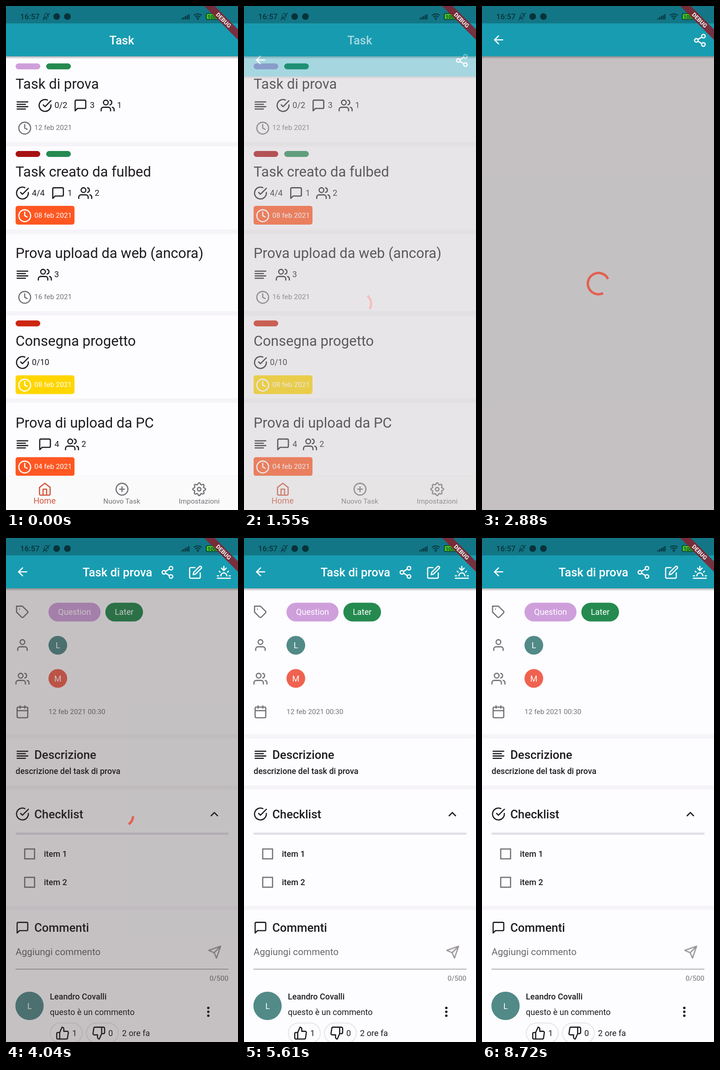
These frames come from a looping animation (508x1102 px, 8820 ms). An HTML page:

```html
<!DOCTYPE html>
<html lang="it">
<head>
<meta charset="utf-8">
<title>Task</title>
<style>
html, body { margin: 0; width: 100%; height: 100%; overflow: hidden; background: #fdfcff; }
svg { display: block; width: 100vw; height: 100vh; font-family: Roboto, "Noto Sans", sans-serif; }
.icon { fill: none; stroke-width: 2; stroke-linecap: round; stroke-linejoin: round; }
#page { animation: rise 8820ms infinite, fade 8820ms infinite linear; }
#wait { animation: leave 8820ms infinite step-end; }
#done { animation: enter 8820ms infinite step-end; }
#busy { animation: clear 8820ms infinite linear; }
@keyframes rise {
  0%, 14.399% { transform: translateY(275.5px); animation-timing-function: cubic-bezier(.4, 0, .2, 1); }
  20.102%, 100% { transform: translateY(0); }
}
@keyframes fade {
  0% { opacity: 0; }
  14.399% { opacity: 0; animation-timing-function: ease-in; }
  17.574% { opacity: .38; }
  20.975% { opacity: .88; }
  23.356%, 100% { opacity: 1; }
}
@keyframes leave { 0% { opacity: 1; } 45.805%, 100% { opacity: 0; } }
@keyframes enter { 0% { opacity: 0; } 45.805%, 100% { opacity: 1; } }
@keyframes clear { 0%, 46.145% { opacity: 1; } 47.732%, 100% { opacity: 0; } }
</style>
</head>
<body>
<svg viewBox="0 0 508 1102" preserveAspectRatio="none">
  <defs>
    <linearGradient id="shade" x2="0" y2="1">
      <stop stop-color="#000" stop-opacity=".3"/>
      <stop offset="1" stop-color="#000" stop-opacity="0"/>
    </linearGradient>
  </defs>
  <g id="list"></g>
  <g id="page">
    <g id="base"></g>
    <g id="wait"></g>
    <g id="done"></g>
    <g id="busy">
      <rect y="110" width="508" height="992" fill="#3c3232" fill-opacity=".29"/>
      <path id="arc" fill="none" stroke="#e2604f" stroke-width="5.2"/>
    </g>
  </g>
  <g id="system"></g>
</svg>
<script>
const LOOP = 8820;
const INK = '#1e1c20', GREY = '#757276', TEAL = '#189cb1', PAPER = '#fdfcff', GAP = '#f6f4f8';
const ORANGE = '#ff5722', YELLOW = '#ffd600', GREEN = '#258a50', LILAC = '#cf9fdc', SEA = '#528a88';
const $ = id => document.getElementById(id);

function gear() {
  let d = '';
  for (let i = 0; i < 96; i++) {
    const a = i * Math.PI / 48, r = 9.5 + 1.4 * Math.cos(8 * a);
    d += (i ? 'L' : 'M') + (12 + r * Math.cos(a)).toFixed(2) + ' ' + (12 + r * Math.sin(a)).toFixed(2);
  }
  return d + 'Z';
}
const ring = (x, y, r) => `M${x - r} ${y}a${r} ${r} 0 1 0 ${2 * r} 0a${r} ${r} 0 1 0 ${-2 * r} 0`;

const ICONS = {
  lines: 'M3 6H21M3 10H17M3 14H21M3 18H17',
  check: 'M22 11.08V12a10 10 0 1 1-5.93-9.14M22 4 12 14.01l-3-3',
  message: 'M21 15a2 2 0 0 1-2 2H7l-4 4V5a2 2 0 0 1 2-2h14a2 2 0 0 1 2 2z',
  users: 'M17 21v-2a4 4 0 0 0-4-4H5a4 4 0 0 0-4 4v2M23 21v-2a4 4 0 0 0-3-3.87M16 3.13a4 4 0 0 1 0 7.75' + ring(9, 7, 4),
  user: 'M20 21v-2a4 4 0 0 0-4-4H8a4 4 0 0 0-4 4v2' + ring(12, 7, 4),
  clock: ring(12, 12, 10) + 'M12 6v6l4 2',
  home: 'M3 9l9-7 9 7v11a2 2 0 0 1-2 2H5a2 2 0 0 1-2-2zM9 22V12h6v10',
  plus: ring(12, 12, 10) + 'M12 8v8M8 12h8',
  gear: gear() + ring(12, 12, 3),
  tag: 'M20.59 13.41l-7.17 7.17a2 2 0 0 1-2.83 0L2 12V2h10l8.59 8.59a2 2 0 0 1 0 2.82zM7 7h.01',
  calendar: 'M5 4h14a2 2 0 0 1 2 2v14a2 2 0 0 1-2 2H5a2 2 0 0 1-2-2V6a2 2 0 0 1 2-2zM16 2v4M8 2v4M3 10h18',
  send: 'M22 2 11 13M22 2l-7 20-4-9-9-4z',
  up: 'M14 9V5a3 3 0 0 0-3-3l-4 9v11h11.28a2 2 0 0 0 2-1.7l1.38-9a2 2 0 0 0-2-2.3zM7 22H4a2 2 0 0 1-2-2v-7a2 2 0 0 1 2-2h3',
  down: 'M10 15v4a3 3 0 0 0 3 3l4-9V2H5.72a2 2 0 0 0-2 1.7l-1.38 9a2 2 0 0 0 2 2.3zm7-13h2.67A2.31 2.31 0 0 1 22 4v7a2.31 2.31 0 0 1-2.33 2H17',
  share: ring(18, 5, 3) + ring(6, 12, 3) + ring(18, 19, 3) + 'M8.59 13.51l6.83 3.98M15.41 6.51l-6.82 3.98',
  edit: 'M11 4H4a2 2 0 0 0-2 2v14a2 2 0 0 0 2 2h14a2 2 0 0 0 2-2v-7M18.5 2.5a2.12 2.12 0 0 1 3 3L12 15l-4 1 1-4z',
  sunset: 'M17 18a5 5 0 0 0-10 0M12 9V2M4.22 10.22l1.42 1.42M1 18h2M21 18h2M18.36 11.64l1.42-1.42M23 22H1M16 5l-4 4-4-4',
  bell: 'M13.73 21a2 2 0 0 1-3.46 0M18.63 13A17.89 17.89 0 0 1 18 8M6.26 6.26A5.86 5.86 0 0 0 6 8c0 7-3 9-3 9h14M18 8a6 6 0 0 0-9.33-5M1 23 23 1'
};

const icon = (name, x, y, color = INK, scale = 1.292) =>
  `<path class="icon" d="${ICONS[name]}" stroke="${color}" transform="translate(${x} ${y}) scale(${scale})"/>`;
const text = (x, y, size, s, fill = INK, weight = 400, anchor = 'start') =>
  `<text x="${x}" y="${y}" font-size="${size}" fill="${fill}" font-weight="${weight}" text-anchor="${anchor}">${s}</text>`;
const rect = (x, y, w, h, fill, r = 0) =>
  `<rect x="${x}" y="${y}" width="${w}" height="${h}" rx="${r}" fill="${fill}"/>`;
const disc = (x, y, r, fill) => `<circle cx="${x}" cy="${y}" r="${r}" fill="${fill}"/>`;
const bar = rect(0, 110, 508, 6, 'url(#shade)') + rect(0, 0, 508, 110, TEAL);

// y is the middle of the card title; parts are [icon, x, label]
function card(y, title, pills, parts, date, fill) {
  let s = pills.map((c, i) => rect(21 + 67 * i, y - 44.5, 54, 13, c, 6.5)).join('');
  s += text(21, y + 11, 31, title);
  for (const [name, x, label] of parts)
    s += icon(name, x, y + 32) + (label ? text(x + 36.3, y + 53, 18.1, label) : '');
  if (fill) s += rect(21, y + 75.5, 129, 41, fill, 5);
  const color = fill ? '#fff' : GREY;
  return s + icon('clock', 25.5, y + 81.5, color) + text(62, y + 101, 15.5, date, color);
}

$('list').innerHTML = rect(0, 0, 508, 1102, PAPER) +
  [297, 489, 667, 858].map(y => rect(0, y, 508, 10, GAP)).join('') +
  card(170, 'Task di prova', [LILAC, GREEN],
    [['lines', 20.5], ['check', 70, '0/2'], ['message', 147.5, '3'], ['users', 207, '1']], '12 feb 2021') +
  card(361.5, 'Task creato da fulbed', ['#a81113', GREEN],
    [['check', 20.5, '4/4'], ['message', 98.5, '1'], ['users', 158, '2']], '08 feb 2021', ORANGE) +
  card(540, 'Prova upload da web (ancora)', [], [['lines', 20.5], ['users', 69.5, '3']], '16 feb 2021') +
  card(732, 'Consegna progetto', ['#cc2510'], [['check', 20.5, '0/10']], '08 feb 2021', YELLOW) +
  card(911, 'Prova di upload da PC', [],
    [['lines', 20.5], ['message', 70, '4'], ['users', 129, '2']], '04 feb 2021', ORANGE) +
  rect(0, 1027, 508, 1, '#f1f0f3') + rect(0, 1028, 508, 74, '#fafafb') +
  icon('home', 69.5, 1041, '#d2573c') + text(84.5, 1088, 18.1, 'Home', '#d2573c', 400, 'middle') +
  icon('plus', 238.5, 1041, GREY) + text(253.5, 1088, 15.5, 'Nuovo Task', GREY, 400, 'middle') +
  icon('gear', 407.5, 1041, GREY) + text(423, 1088, 15.5, 'Impostazioni', GREY, 400, 'middle') +
  bar + text(253.5, 84, 25.8, 'Task', '#fff', 500, 'middle');

$('base').innerHTML = rect(0, 0, 508, 1102, PAPER) + bar +
  '<path d="M20 11H7.83l5.59-5.59L12 4l-8 8 8 8 1.41-1.41L7.83 13H20z" fill="#fff" transform="translate(20.5 58.5) scale(1.292)"/>';
$('wait').innerHTML = icon('share', 461.5, 59.5, '#fff');

const chip = (x, w, fill, s) => rect(x, 141.5, w, 41, fill, 20.5) + text(x + w / 2, 168, 18.1, s, '#fff', 400, 'middle');
const avatar = (x, y, r, fill, s) => disc(x, y, r, fill) + text(x, y + 6.5, 18.1, s, '#fff', 400, 'middle');
const item = (y, s) =>
  `<rect x="41" y="${y - 10.5}" width="21.5" height="21.5" fill="none" stroke="${GREY}" stroke-width="2.6"/>` +
  text(83, y + 6.5, 18, s, INK, 500);
const head = (name, y, s) => icon(name, 20.5, y - 15.5, INK) + text(62, y + 9, 25.8, s, INK, 500);
const vote = (x, name, n) =>
  `<rect x="${x}" y="1060.5" width="70" height="44" rx="22" fill="none" stroke="#e6e3ea" stroke-width="2"/>` +
  icon(name, x + 11.5, 1067) + text(x + 48, 1089, 18.1, n);

$('done').innerHTML =
  text(244, 84, 25.8, 'Task di prova', '#fff', 500, 'middle') +
  icon('share', 338, 59.5, '#fff') + icon('edit', 399.5, 59.5, '#fff') + icon('sunset', 461.5, 59.5, '#fff') +
  [429, 541, 804].map(y => rect(0, y, 508, 9, GAP)).join('') +
  icon('tag', 20.5, 146.5, GREY) + chip(93, 114, LILAC, 'Question') + chip(217.5, 82.5, GREEN, 'Later') +
  icon('user', 20.5, 218.5, GREY) + avatar(113.5, 234.5, 20.5, SEA, 'L') +
  icon('users', 20.5, 292, GREY) + avatar(113.5, 307, 20.5, '#f0624f', 'M') +
  icon('calendar', 20.5, 364.5, GREY) + text(93, 385, 15.5, '12 feb 2021 00:30', GREY) +
  head('lines', 474, 'Descrizione') + text(21, 516, 18, 'descrizione del task di prova', INK, 500) +
  head('check', 603.5, 'Checklist') +
  `<path d="M448.5 608l7.7-7.7 7.7 7.7" fill="none" stroke="${INK}" stroke-width="2.6"/>` +
  rect(21, 644, 466, 5, '#e3e0e7') + item(690.5, 'item 1') + item(752.5, 'item 2') +
  head('message', 852, 'Commenti') + text(21, 911.5, 20.7, 'Aggiungi commento', '#6b686c') +
  icon('send', 441.5, 890, '#98949a') + rect(21, 942, 466, 1.3, '#8c8a8c') +
  text(487, 968, 15.5, '0/500', GREY, 400, 'end') +
  avatar(51.5, 1023, 31, SEA, 'L') + text(96, 1009, 18, 'Leandro Covalli', INK, 500) +
  text(96, 1042.5, 18.1, 'questo è un commento') +
  [1027.5, 1036, 1044.5].map(y => disc(443, y, 2.7, INK)).join('') +
  vote(97, 'up', '1') + vote(176, 'down', '0') + text(254, 1089, 18.1, '2 ore fa');

const DARK = '#08323a';
$('system').innerHTML = rect(0, 0, 508, 38, 'rgba(0,0,0,.24)') +
  text(31, 29, 16.8, '16:57', DARK, 500) + icon('bell', 80, 15, DARK, .68) +
  disc(111, 23, 7.3, DARK) + disc(134.5, 23, 7.3, DARK) +
  [0, 1, 2, 3, 4].map(i => rect(384 + 3.8 * i, 26.5 - 2.2 * i, 2.5, 3 + 2.2 * i, DARK, .6)).join('') +
  `<path d="M411.5 20.5a12.5 12.5 0 0 1 17 0M414.5 24a8 8 0 0 1 11 0M417.3 27.2a4 4 0 0 1 5.4 0" fill="none" stroke="${DARK}" stroke-width="2"/>` +
  disc(420, 29, 1.5, DARK) +
  `<rect x="438.5" y="16.500" width="25" height="13" rx="3" fill="#45c51d" stroke="${DARK}" stroke-width="1.6"/>` +
  rect(465, 20, 2, 6, DARK) + text(451, 27.500, 11.500, '100', DARK, 500, 'middle') +
  `<path d="M472 17l-4 7h3l-1 6 5-8h-3z" fill="${DARK}"/>` +
  '<path d="M434 0h23l51 51v23z" fill="#85222f" fill-opacity=".88"/>' +
  '<g transform="translate(476.500 31) rotate(45)">' +
  text(.6, 5.600, 12.800, 'DEBUG', 'rgba(0,0,0,.45)', 900, 'middle') +
  text(0, 4.600, 12.800, 'DEBUG', '#f3e6e8', 900, 'middle') + '</g>';

// cubic-bezier(.4, 0, .2, 1)
function ease(x) {
  if (x <= 0) return 0;
  if (x >= 1) return 1;
  let lo = 0, hi = 1, s = .5;
  for (let i = 0; i < 24; i++) {
    s = (lo + hi) / 2;
    const v = 1.2 * s * (1 - s) ** 2 + .6 * s * s * (1 - s) + s ** 3;
    if (v < x) lo = s; else hi = s;
  }
  return s * s * (3 - 2 * s);
}

// loop time -> spinner time, with pauses while data loads
const PACE = [[1270, 50], [1550, 180], [1850, 320], [2060, 400], [2160, 400], [3810, 1020], [LOOP, 1020]];
function spinTime(t) {
  if (t <= PACE[0][0]) return PACE[0][1];
  const i = PACE.findIndex(p => t <= p[0]);
  const [t0, a] = PACE[i - 1], [t1, b] = PACE[i];
  return a + (b - a) * (t - t0) / (t1 - t0);
}

function spin(t) {
  const e = spinTime(t), p = e / 1333;
  const from = 1.5 * ease(2 * p - 1), to = 1.5 * ease(2 * p);
  const start = Math.PI * (-.5 + from + 2 * e / 2222 + p / 2);
  const sweep = Math.max(.001, Math.PI * (to - from));
  const at = a => `${(255 + 23.3 * Math.cos(a)).toFixed(2)} ${(607 + 23.3 * Math.sin(a)).toFixed(2)}`;
  $('arc').setAttribute('d', `M${at(start)}A23.3 23.3 0 ${+(sweep > Math.PI)} 1 ${at(start + sweep)}`);
}

const begin = performance.now();
function tick() {
  spin((performance.now() - begin) % LOOP);
  requestAnimationFrame(tick);
}
tick();
</script>
</body>
</html>
```
